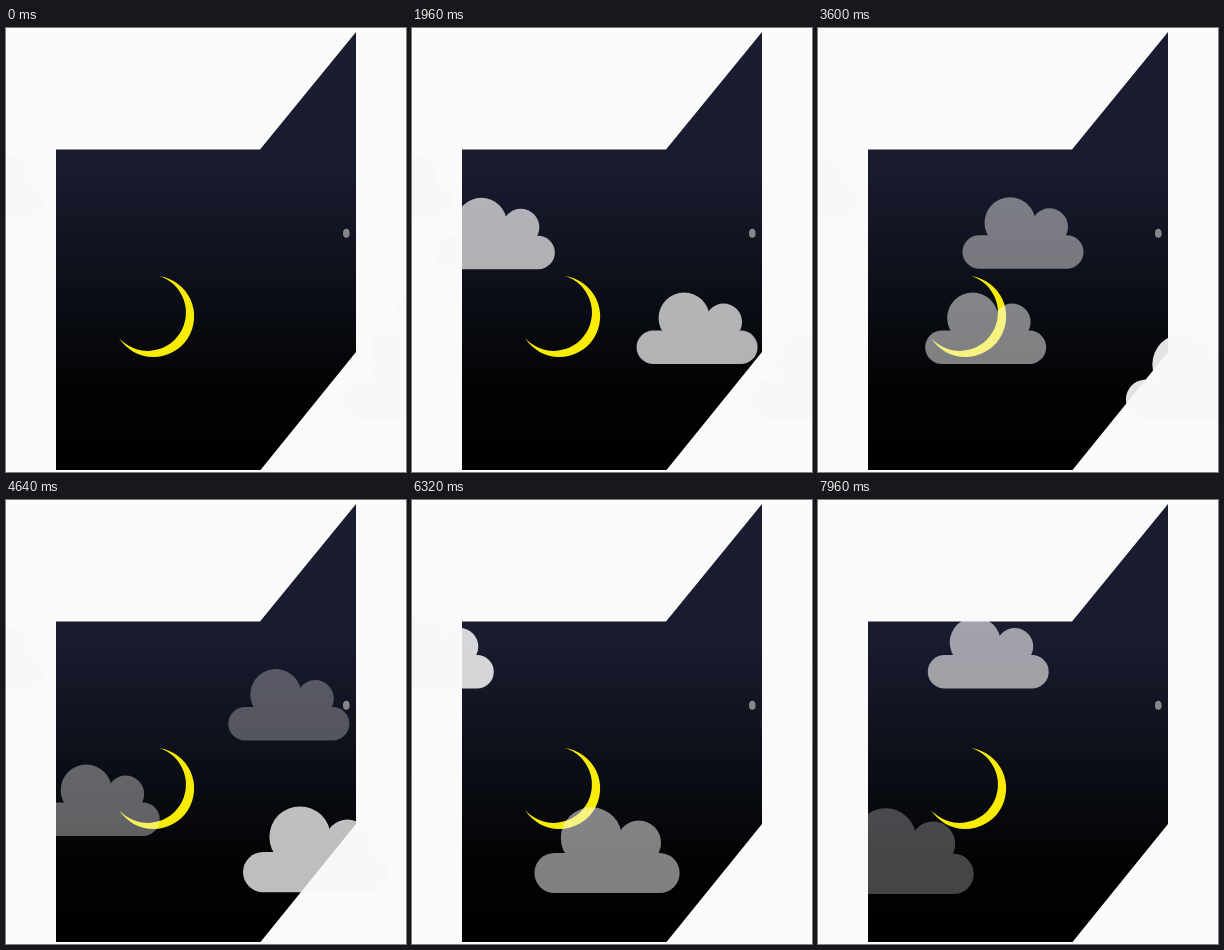
An HTML page for the animation above (8 s loop, 400 by 444 pixels).

```html
<!DOCTYPE html>
<html lang="en">
<head>
<meta charset="utf-8">
<title>Night clouds</title>
<style>
  html, body { margin: 0; width: 100%; height: 100%; overflow: hidden; background: #fafafa; }
  svg { display: block; width: 100%; height: 100%; }
</style>
</head>
<body>
<svg viewBox="0 0 400 444" xmlns="http://www.w3.org/2000/svg">
  <defs>
    <linearGradient id="night" gradientUnits="userSpaceOnUse" x1="0" y1="4" x2="0" y2="442">
      <stop offset="0" stop-color="#1a1c30"/>
      <stop offset=".3" stop-color="#191b2f"/>
      <stop offset=".47" stop-color="#131422"/>
      <stop offset=".65" stop-color="#090c12"/>
      <stop offset=".81" stop-color="#030304"/>
      <stop offset="1" stop-color="#000"/>
    </linearGradient>
    <g id="cloud" fill="#f8f8f8">
      <rect y="38" width="121" height="33.5" rx="16.75"/>
      <rect x="47" y="28" width="40" height="14"/>
      <circle cx="47.5" cy="25.5" r="25.5"/>
      <circle cx="87" cy="29.5" r="18.5"/>
    </g>
  </defs>
  <rect width="400" height="444" fill="#fafafa"/>
  <path d="M50 121.4H254L350 4V324L254.5 442H50Z" fill="url(#night)"/>
  <ellipse cx="340.3" cy="205.3" rx="3.3" ry="4.5" fill="#87878a"/>
  <path d="M153 248A40.7 40.7 0 1 1 113 310A38.3 38.3 0 1 0 153 248Z" fill="#f8ec06"/>
  <g id="sky"></g>
</svg>
<script>
  const LOOP = 8, STEP = 0.04;
  const sky = document.getElementById('sky');

  // x, y and alpha hold at time `at` (seconds); vx, vy and fade are rates per second.
  // A cloud waits in place until `start`.
  const clouds = [
    { at: 1.2,  x: -35,  y: 170,   vx: 74.8,  vy: -0.3, alpha: 0.8,   fade: 0.147,  scale: 1,   start: 0 },
    { at: 1.2,  x: 279,  y: 264.5, vx: -71.6, vy: 0,    alpha: 0.81,  fade: 0.127,  scale: 1,   start: 0 },
    { at: 4.64, x: 237,  y: 306.4, vx: -68.2, vy: 0.55, alpha: 0.763, fade: 0.1485, scale: 1.2, start: 3.17 },
    { at: 7.04, x: 26.2, y: 117,   vx: 90.8,  vy: 0,    alpha: 0.745, fade: 0.145,  scale: 1,   start: 5.86 }
  ];

  for (const c of clouds) {
    c.node = document.createElementNS('http://www.w3.org/2000/svg', 'g');
    c.node.innerHTML = '<use href="#cloud"/>';
    sky.appendChild(c.node);
  }

  const clamp = v => Math.min(1, Math.max(0, v));

  function draw(t) {
    for (const c of clouds) {
      const d = Math.max(t, c.start) - c.at;
      const x = c.x + c.vx * d, y = c.y + c.vy * d;
      const alpha = t < c.start ? 1 : clamp(c.alpha - c.fade * d);
      c.node.setAttribute('transform', `translate(${x.toFixed(2)} ${y.toFixed(2)}) scale(${c.scale})`);
      c.node.setAttribute('opacity', alpha.toFixed(4));
    }
  }

  const origin = performance.now();
  function tick() {
    const t = ((performance.now() - origin) / 1000) % LOOP;
    draw(Math.floor(t / STEP + 1e-6) * STEP);
    requestAnimationFrame(tick);
  }
  tick();
</script>
</body>
</html>
```
